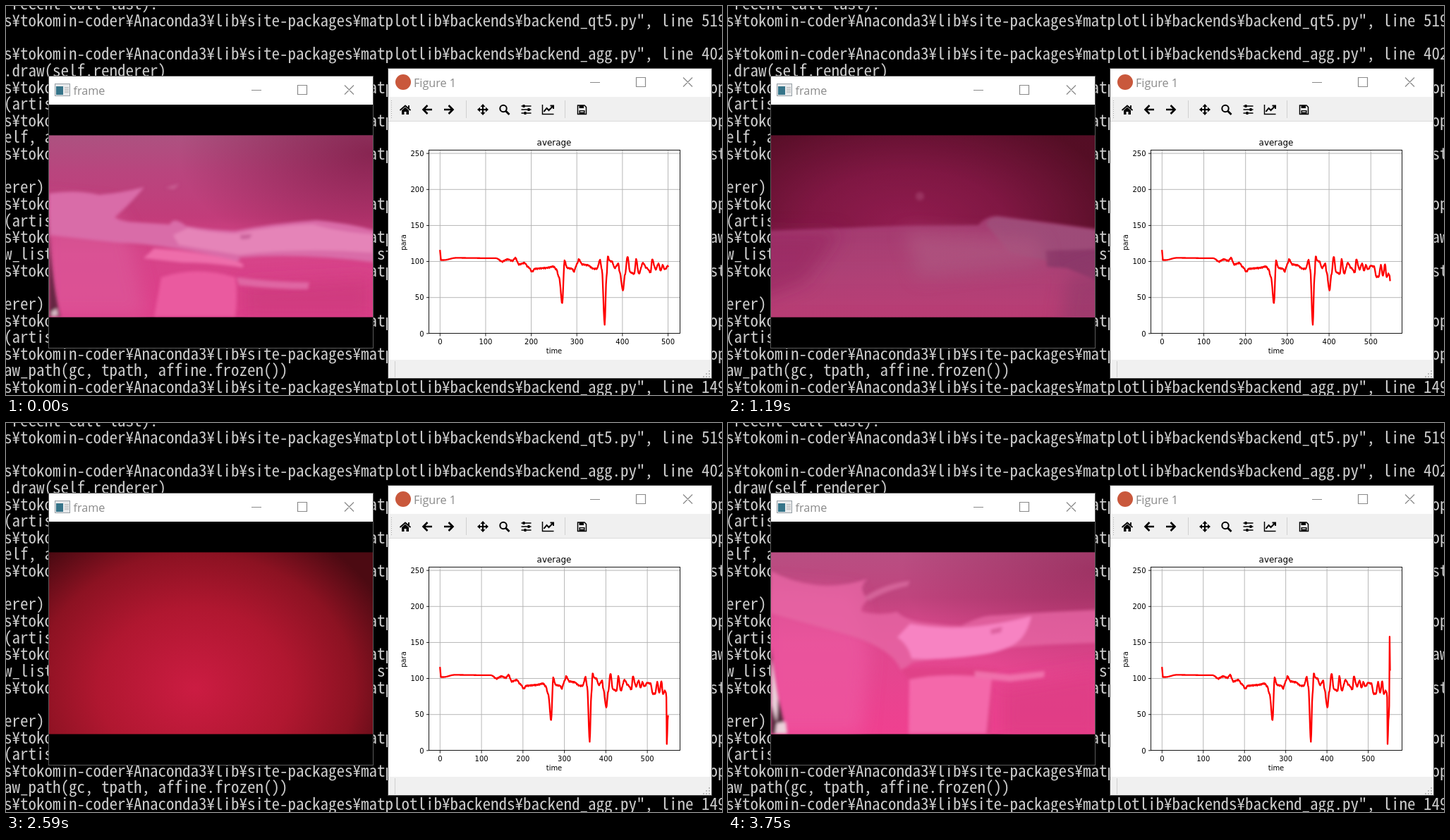
Animation, 1015 px wide and 552 px high, one loop 3.9 s. Source, as an HTML page:

```html
<!DOCTYPE html>
<html lang="en">
<head>
<meta charset="utf-8">
<title>Camera average plot</title>
<style>
  html, body { margin: 0; width: 100%; height: 100%; overflow: hidden; background: #000; }
  svg { display: block; width: 1015px; height: 552px; }
  text { white-space: pre; }
  #terminal { fill: #ccc; font-family: "Noto Sans Mono CJK JP", "Noto Sans Mono", monospace; }
  .title { font: 16.2px "Open Sans", "Noto Sans", sans-serif; fill: #8a8a8a; }
  .plot { font: 9.96px "DejaVu Sans", sans-serif; fill: #000; }
  .mid { text-anchor: middle; }
  .end { text-anchor: end; }
  .ctl { fill: none; stroke: #8a8a8a; stroke-width: 1.2; }
  .grid { stroke: #b0b0b0; stroke-width: .9; }
  .tick { stroke: #000; stroke-width: .9; }
</style>
</head>
<body>
<svg viewBox="0 0 1015 552" xmlns="http://www.w3.org/2000/svg">
  <defs>
    <clipPath id="screen"><rect x="61" y="183.5" width="459" height="258"/></clipPath>
    <filter id="soft" x="-20%" y="-20%" width="140%" height="140%"><feGaussianBlur stdDeviation="2"/></filter>
    <filter id="blur" x="-30%" y="-30%" width="160%" height="160%"><feGaussianBlur stdDeviation="5"/></filter>
    <filter id="haze" x="-40%" y="-40%" width="180%" height="180%"><feGaussianBlur stdDeviation="12"/></filter>
    <linearGradient id="handBase" x2="0" y2="1">
      <stop stop-color="#ac5280"/><stop offset=".2" stop-color="#b9457e"/>
      <stop offset=".45" stop-color="#c23c7a"/><stop offset=".65" stop-color="#d64489"/>
      <stop offset="1" stop-color="#df3f8b"/>
    </linearGradient>
    <radialGradient id="corner" cx="1" cy=".1" r=".6">
      <stop stop-color="#701038" stop-opacity=".65"/><stop offset="1" stop-color="#701038" stop-opacity="0"/>
    </radialGradient>
    <radialGradient id="nearTop" cx=".42" cy=".5" r=".68">
      <stop stop-color="#b92468"/><stop offset=".45" stop-color="#a41e58"/><stop offset="1" stop-color="#6c1230"/>
    </radialGradient>
    <linearGradient id="nearLow" x2="0" y2="1">
      <stop stop-color="#cf4c92"/><stop offset=".5" stop-color="#df559b"/><stop offset="1" stop-color="#f4509a"/>
    </linearGradient>
    <radialGradient id="darkFill" cx=".45" cy=".6" r=".65">
      <stop stop-color="#1e0608"/><stop offset="1" stop-color="#0d0203"/>
    </radialGradient>
    <radialGradient id="redFill" cx=".45" cy=".75" r=".66" gradientTransform="translate(0 -.375) scale(1 1.5)">
      <stop stop-color="#cb1c42"/><stop offset=".45" stop-color="#b01730"/>
      <stop offset=".75" stop-color="#8c1222"/><stop offset="1" stop-color="#4c0a12"/>
    </radialGradient>
    <linearGradient id="glareTop" x2="0" y2="1">
      <stop stop-color="#f2699a"/><stop offset=".15" stop-color="#fb5a94"/>
      <stop offset=".27" stop-color="#fb72b4"/><stop offset=".4" stop-color="#f4a0e0"/>
    </linearGradient>
    <linearGradient id="glareLow" x2="1" y2="0">
      <stop stop-color="#ff9ade"/><stop offset=".35" stop-color="#fdc4f7"/>
      <stop offset=".8" stop-color="#fde2fc"/><stop offset="1" stop-color="#fcc6f4"/>
    </linearGradient>
    <linearGradient id="backBase" x2="0" y2="1">
      <stop stop-color="#b84f82"/><stop offset=".25" stop-color="#c0447e"/>
      <stop offset=".5" stop-color="#e0488f"/><stop offset="1" stop-color="#f04090"/>
    </linearGradient>
  </defs>
  <rect width="1015" height="552"/>
  <g id="terminal"></g>

  <g id="camera">
    <rect x="60" y="99" width="461" height="387" fill="#5a5a5a"/>
    <rect x="61" y="140" width="459" height="345"/>
    <rect x="61" y="100" width="459" height="40" fill="#fff"/>
    <rect x="69.5" y="110.5" width="21" height="17" fill="#e8eaec" stroke="#98a0a6"/>
    <rect x="71" y="114" width="10" height="12" fill="#367489"/>
    <path d="M83 116h6M83 119h6M83 122h6" stroke="#aaa"/>
    <text class="title" x="95.5" y="126">frame</text>
    <g clip-path="url(#screen)">
      <g id="hand">
        <rect x="61" y="183" width="459" height="259" fill="url(#handBase)"/>
        <rect x="61" y="183" width="459" height="259" fill="url(#corner)"/>
        <g filter="url(#haze)">
          <path d="M50 275L150 285 175 330 200 441H50z" fill="#dc5a9c" opacity=".6"/>
          <path d="M335 395L520 385V441H335z" fill="#c83678" opacity=".6"/>
        </g>
        <g filter="url(#soft)">
          <path d="M61 266Q100 260 132 268Q165 265 196 257Q178 279 154 300Q165 307 185 307L232 310Q238 298 255 312Q290 318 325 319Q380 308 440 304Q485 308 525 319V364Q420 350 330 357Q335 362 325 362Q280 350 240 344Q190 336 160 336Q105 330 61 325z" fill="#d96ca8"/>
          <path d="M258 315Q290 322 325 323Q380 312 435 310Q470 320 520 324V350Q420 342 330 353Q280 345 245 339L237 325z" fill="#e584b8"/>
          <path d="M210 344Q270 348 320 360Q342 366 335 371Q290 364 250 364L195 358z" fill="#ee6daa"/>
          <path d="M220 385Q270 368 325 385Q329 410 325 441H210z" fill="#ea5a9f"/>
          <path d="M327 385Q380 392 430 392L428 402Q380 402 330 396z" fill="#df66a3"/>
          <path d="M226 258L246 252 238 260z" fill="#c75e92"/>
          <path d="M332 325L349 324 345 330 333 331z" fill="#c8609a"/>
          <path d="M61 290Q62 380 77 441H61z" fill="#652843"/>
          <path d="M64 434l8-5 2 10-9 2z" fill="#d8b8c4"/>
        </g>
      </g>
      <g id="near">
        <rect x="61" y="183" width="459" height="259" fill="url(#nearTop)"/>
        <g filter="url(#soft)">
          <path d="M55 319Q160 315 240 312L355 311Q365 298 382 298L445 306 525 317V450H55z" fill="url(#nearLow)"/>
          <path d="M366 310Q370 299 382 299L520 318V347L450 348 455 362 400 350z" fill="#cc639f"/>
          <path d="M450 347L525 345V390L480 372 452 370z" fill="#b64c8c"/>
          <circle cx="272" cy="270" r="6" fill="#c5427e"/>
        </g>
        <g filter="url(#haze)">
          <path d="M250 320L440 330 450 365 270 385z" fill="#df70a9" opacity=".75"/>
          <path d="M30 318L160 320 110 390 30 420z" fill="#bd2877" opacity=".55"/>
          <path d="M480 385L550 360V460H470z" fill="#bd4c8c" opacity=".6"/>
        </g>
      </g>
      <rect id="dark" x="61" y="183" width="459" height="259" fill="url(#darkFill)"/>
      <rect id="red" x="61" y="183" width="459" height="259" fill="url(#redFill)"/>
      <rect id="flare" x="61" y="183" width="459" height="259" fill="#ff3c78"/>
      <g id="glare">
        <rect x="61" y="183" width="459" height="259" fill="url(#glareTop)"/>
        <path d="M30 253Q110 258 165 252L240 242Q232 264 200 287Q215 302 240 298T300 284H370L445 288 465 278 550 276V470H30z" fill="url(#glareLow)" filter="url(#blur)"/>
        <g filter="url(#soft)">
          <path d="M236 243Q232 266 197 288Q200 303 228 299Q262 294 292 284Q275 272 262 256z" fill="#f17fc6" opacity=".75"/>
          <path d="M165 256L238 242Q228 262 192 284Q178 272 165 256z" fill="#fcc4f3"/>
          <path d="M275 293L300 284H370L442 290 465 279 525 277V368L400 376 420 395 300 386Q265 330 275 293z" fill="#fffaff"/>
          <path d="M408 309L440 310 446 319 425 324z" fill="#fae0f4"/>
          <path d="M402 374L520 380V392L430 397z" fill="#f9cbf0"/>
          <path d="M205 418Q280 410 375 424V441H200z" fill="#fff4f8"/>
          <circle cx="305" cy="259" r="4" fill="#ffb5e4"/>
        </g>
        <g filter="url(#haze)">
          <path d="M255 305L510 300V368H225z" fill="#fff"/>
          <path d="M40 275L90 275 110 441H40z" fill="#ff8cd0" opacity=".6"/>
        </g>
      </g>
      <g id="back">
        <rect x="61" y="183" width="459" height="259" fill="url(#backBase)"/>
        <rect x="61" y="183" width="459" height="259" fill="url(#corner)" opacity=".6"/>
        <g filter="url(#haze)">
          <path d="M50 230L180 240 200 330 190 441H50z" fill="#ef5aa3" opacity=".65"/>
          <path d="M385 375L530 350V450H385z" fill="#dc3b82" opacity=".7"/>
        </g>
        <g filter="url(#soft)">
          <path d="M61 210Q90 226 125 230T198 221Q182 236 199 250Q186 262 190 268Q215 274 240 268Q250 280 285 284T330 288Q360 272 380 273Q450 268 525 265V312Q440 314 400 319T262 340L245 351Q235 322 175 302L61 270z" fill="#e666a4" opacity=".8"/>
          <path d="M258 285Q295 292 335 290T430 274Q424 300 410 311T365 328Q300 338 260 334Q256 315 240 304z" fill="#f783c2"/>
          <path d="M192 248Q220 228 258 224L255 231Q220 239 201 252z" fill="#d46399"/>
          <path d="M372 293l17-4-2 8-14 3z" fill="#dd609f"/>
          <path d="M245 349Q310 342 382 350L375 362 373 441H258V367z" fill="#e04388"/>
          <path d="M257 364Q310 353 374 362L366 441H256z" fill="#f467aa"/>
          <path d="M350 352L400 357 449 352 448 361 400 367 350 362z" fill="#f06fab"/>
          <path d="M61 320Q68 390 84 441H61z" fill="#572a3c"/>
          <path d="M62 335L71 390 69 425 62 400zM69 426L82 424 84 441H67z" fill="#ecd0da"/>
        </g>
      </g>
    </g>
  </g>

  <g id="figure">
    <rect x="541" y="88" width="460" height="441" fill="#444"/>
    <rect x="542" y="89" width="458" height="439" fill="#fff"/>
    <path d="M542 129h458v34h-458zM542 502h458v26h-458z" fill="#f0f0f0"/>
    <path d="M542 163.5h458" stroke="#dcdcdc"/>
    <path d="M652.5 134v25M792.5 134v25M551.5 504v23" stroke="#d0d0d0"/>
    <path d="M546.5 134v26" stroke="#aaa" stroke-dasharray="1 2"/>
    <path d="M996 518h2M992 522h2M996 522h2M988 526h2M992 526h2M996 526h2" stroke="#bbb" stroke-width="2"/>
    <circle cx="563" cy="108" r="11" fill="#c9583c"/>
    <text class="title" x="578" y="115">Figure 1</text>
    <g id="tools" fill="none" stroke="#000" stroke-width="2">
      <path d="M558.5 148l7.500-6.500 7.500 6.500M571 141v4" stroke-width="1.8"/>
      <path d="M561 148l5-4.500 5 4.500v6h-3.500v-4h-3v4H561z" fill="#000" stroke="none"/>
      <path d="M604 147H592M597.5 141l-6 6 6 6M621 147h12M627.5 141l6 6-6 6" stroke-width="2.6"/>
      <path d="M669 147h14M676 140v14"/>
      <path d="M668 147l4-3.500v7zM684 147l-4-3.500v7zM676 139l-3.500 4h7zM676 155l-3.500-4h7z" fill="#000" stroke="none"/>
      <circle cx="705" cy="145.5" r="4.7"/><path d="M708.5 149l5 5" stroke-width="2.8"/>
      <path d="M730.5 142h14M730.5 147h14M730.5 152h14" stroke-width="1.6"/>
      <path d="M734 140v4M741 145v4M736 150v4" stroke-width="3"/>
      <path d="M760.5 140v13.500h16" stroke-width="1.5"/>
      <path d="M762.5 150l4-5 3 3 6-6M771.5 141.500h4.500v4.500"/>
      <path d="M810.5 141h9.500l2.500 2.500v10h-12z" stroke-width="1.5"/>
      <path d="M812.5 141h6.500v4h-6.500zM812.5 148h8v5h-8z" fill="#000" stroke="none"/>
      <path d="M814 150h5" stroke="#fff" stroke-width="1.3"/>
    </g>
    <g class="plot">
      <text class="mid" x="777" y="198" style="font-size:11.95px">average</text>
      <text class="mid" x="777" y="493">time</text>
      <text class="mid" transform="translate(567 335.5) rotate(-90)">para</text>
      <g id="yAxis"></g>
      <g id="xAxis"></g>
    </g>
    <path id="curve" fill="none" stroke="#f00" stroke-width="2.3" stroke-linejoin="round" stroke-linecap="square"/>
    <rect x="599.5" y="204.5" width="356" height="260" fill="none" stroke="#000" stroke-width=".9"/>
  </g>
  <g id="controls" class="ctl"></g>
</svg>
<script>
const $ = id => document.getElementById(id);

// Terminal: half-width columns 11.5 px wide.
const column = 11.5, rowHeight = 23.64;
const lib = 's¥tokomin-coder¥Anaconda3¥lib¥site-packages¥matplotlib¥';
const trace = (file, tail = '') => (lib + file).padEnd(87) + tail;
const call = '(artist, renderer, *args, **kwargs)';
const artist = 'artist.py", line 50,';
const rows = [
  ' recent call last):',
  lib + 'backends¥backend_qt5.py", line 519', '',
  lib + 'backends¥backend_agg.py", line 402',
  '.draw(self.renderer)',
  trace(artist, 'op'), call,
  trace('figure.py", line 1652,', 'op'), 'elf, artists)',
  trace('image.py", line 138,', 'st'), '', 'erer)',
  trace(artist, 'op'), call,
  trace('axes¥_base.py", line 2604,', 'aw'), 'w_list_compositing_images(renderer, self, art'.padEnd(46) + 'sts)',
  trace('image.py", line 138,', 'st'), '', 'erer)',
  trace(artist, 'op'), call,
  trace('lines.py", line 759,', 'op'),
  'aw_path(gc, tpath, affine.frozen())',
  lib + 'backends¥backend_agg.py", line 149'
];
const pen = document.createElement('canvas').getContext('2d');
pen.font = '100px ' + getComputedStyle($('terminal')).fontFamily;
$('terminal').style.fontSize = column * 100 / pen.measureText('m').width + 'px';
rows.forEach((row, i) => {
  const line = document.createElementNS('http://www.w3.org/2000/svg', 'text');
  line.setAttribute('x', -3);
  line.setAttribute('y', 29 + rowHeight * (i - 1));
  line.textContent = row;
  $('terminal').append(line);
});

const buttons = (x, y) =>
  `<path d="M${x} ${y + .5}h14M${x + 65.5} ${y - 6.5}h13v13h-13zM${x + 132} ${y - 6.5}l13 13m0-13l-13 13"/>`;
$('controls').innerHTML = buttons(348, 119) + buttons(828, 108);

// Plot
const left = 615.3, span = 323.2;
const yOf = value => 464.8 - value * 1.0224;
const knots = [
  [0, 115], [2, 102], [8, 102], [35, 105], [123, 104.5], [136, 100], [148, 103], [159, 101],
  [165, 105], [173, 96], [185, 98], [194, 92], [202, 86], [208, 90], [231, 91], [249, 93],
  [255, 89], [261, 78], [268, 42], [273, 101], [279, 91], [290, 90], [293, 86],
  [301, 97], [304, 103], [312, 96], [323, 95], [337, 90], [344, 90], [351, 102], [355, 88],
  [361, 13], [365, 78], [368, 107], [372, 101], [377, 100], [383, 91], [391, 97], [394, 85],
  [401, 60], [406, 83], [411, 107], [417, 85], [426, 83], [430, 103], [436, 83], [445, 98],
  [453, 91], [462, 85], [465, 103], [473, 89], [479, 97], [484, 87], [488, 95], [493, 89],
  [500, 94], [508, 93], [513, 79], [519, 79], [524, 95], [529, 80], [534, 96], [538, 78],
  [542, 83], [545, 80]
];
const latest = [74, 9, 22, 42, 48, 62, 158, 112];
const ease = p => p * p * (3 - 2 * p);
const samples = [];
knots.slice(1).forEach(([x1, v1], k) => {
  const [x0, v0] = knots[k];
  for (let x = x0; x < x1; x++) {
    const ripple = x > 128 ? Math.sin(x * 2.1) * Math.sin(x * .7) : 0;
    samples.push(v0 + (v1 - v0) * ease((x - x0) / (x1 - x0)) + ripple);
  }
});
samples.push(80, ...latest);

for (let v = 0; v <= 250; v += 50) {
  const y = yOf(v);
  $('yAxis').innerHTML += (v ? `<path class="grid" d="M600 ${y}h355"/>` : '') +
    `<path class="tick" d="M596 ${y}h3.5"/><text class="end" x="592.5" y="${y + 3.8}">${v}</text>`;
}

function drawPlot(count) {
  const xOf = i => left + span * i / count;
  let axis = '';
  for (let i = 0; i <= count; i += 100) {
    const x = xOf(i);
    axis += `<path class="grid" d="M${x} 205v260"/><path class="tick" d="M${x} 465v3.5"/>` +
      `<text class="mid" x="${x}" y="479.5">${i}</text>`;
  }
  $('xAxis').innerHTML = axis;
  $('curve').setAttribute('d', 'M' + samples.slice(0, count + 1)
    .map((v, i) => xOf(i).toFixed(2) + ' ' + yOf(v).toFixed(2)).join('L'));
}

// Start time, sample count and opacity of each picture layer.
const loop = 3900;
const layers = ['hand', 'near', 'dark', 'red', 'flare', 'glare', 'back'];
const steps = [
  [0, 500, { hand: 1 }],
  [100, 501, { hand: 1 }],
  [480, 502, { hand: 1 }],
  [710, 544, { near: 1 }],
  [880, 545, { near: 1 }],
  [1190, 546, { near: 1, dark: .25 }],
  [1570, 547, { dark: 1 }],
  [1870, 548, { dark: 1, red: .4 }],
  [2190, 549, { dark: 1, red: .8 }],
  [2590, 550, { red: 1 }],
  [2970, 551, { red: 1, flare: .25 }],
  [3350, 552, { glare: 1 }],
  [3750, 553, { back: 1 }]
];
let shown;

function render(time) {
  const step = steps.findLast(([start]) => start <= time % loop);
  if (step !== shown) {
    shown = step;
    const [, count, mix] = step;
    for (const id of layers) {
      $(id).style.display = mix[id] ? '' : 'none';
      $(id).style.opacity = mix[id] || 0;
    }
    drawPlot(count);
  }
}

const begin = performance.now();
function tick() {
  render(performance.now() - begin);
  requestAnimationFrame(tick);
}
tick();
</script>
</body>
</html>
```
